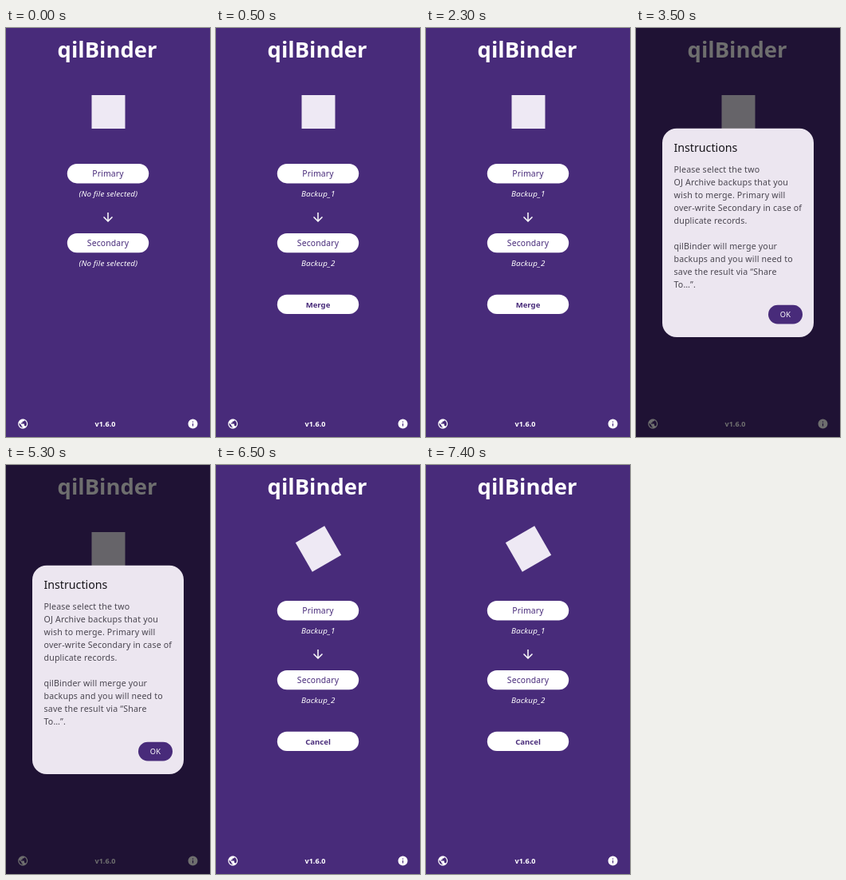
Recreate the animation shown at these times as an HTML page with a canvas. Size 256 px wide and 512 px high, loop 8 s.

```html
<!DOCTYPE html>
<html lang="en">
<head>
<meta charset="utf-8">
<style>
  html, body { margin: 0; width: 100%; height: 100%; overflow: hidden; background: #482b7a; }
  canvas { display: block; width: 256px; height: 512px; }
</style>
</head>
<body>
<canvas id="stage" width="256" height="512"></canvas>
<script>
const ctx = document.getElementById('stage').getContext('2d');
const LOOP = 8000, SELECTED = 500, DIALOG = 3500, MERGING = 6500;
const PURPLE = '#482b7a', WHITE = '#ffffff';

const globe = new Path2D('M12 2C6.48 2 2 6.48 2 12s4.48 10 10 10 10-4.48 10-10S17.52 2 12 2z' +
  'm-1 17.93c-3.95-.49-7-3.85-7-7.93 0-.62.08-1.21.21-1.79L9 15v1c0 1.1.9 2 2 2v1.93z' +
  'm6.9-2.54c-.26-.81-1-1.39-1.9-1.39h-1v-3c0-.55-.45-1-1-1H8v-2h2c.55 0 1-.45 1-1V7h2' +
  'c1.1 0 2-.9 2-2v-.41c2.93 1.19 5 4.06 5 7.41 0 2.08-.8 3.97-2.1 5.39z');
const info = new Path2D('M12 2a10 10 0 1 0 0 20a10 10 0 1 0 0-20zM11 7h2v2h-2zM11 11h2v6h-2z');
const downArrow = new Path2D('M20 12l-1.41-1.41L13 16.17V4h-2v12.17l-5.58-5.59L4 12l8 8 8-8z');

const paragraphs = [
  [180.5, ['Please select the two', 'OJ Archive backups that you', 'wish to merge. Primary will',
    'over-write Secondary in case of', 'duplicate records.']],
  [277, ['qilBinder will merge your', 'backups and you will need to', 'save the result via “Share', 'To…”.']]
];

function text(str, x, y, font, color, align = 'center', spacing = 0.15) {
  ctx.font = `${font} "Noto Sans", sans-serif`;
  ctx.letterSpacing = spacing + 'px';
  ctx.textAlign = align;
  ctx.fillStyle = color;
  ctx.fillText(str, x, y);
}

function box(x, y, w, h, r, color) {
  ctx.fillStyle = color;
  ctx.beginPath();
  ctx.roundRect(x, y, w, h, r);
  ctx.fill();
}

function icon(path, x, y, size) {
  ctx.save();
  ctx.translate(x - size / 2, y - size / 2);
  ctx.scale(size / 24, size / 24);
  ctx.fillStyle = WHITE;
  ctx.fill(path, 'evenodd');
  ctx.restore();
}

function button(label, y, font, spacing) {
  box(76.8, y, 102.4, 24.4, 12.2, WHITE);
  text(label, 128, y + 16, font, PURPLE, 'center', spacing);
}

function emblem(angle) {
  ctx.save();
  ctx.translate(128.5, 105);
  ctx.rotate(angle);
  box(-21, -21, 42, 42, 0, '#eee9f4');
  ctx.restore();
}

function mainScreen(selected, merging) {
  ctx.fillStyle = PURPLE;
  ctx.fillRect(0, 0, 256, 512);
  text('qilBinder', 127, 36.5, '600 27.4px', WHITE, 'center', 0);
  emblem(merging ? -Math.PI / 6 : 0);

  button('Primary', 170, '400 10.4px', 0.15);
  button('Secondary', 256.9, '400 10.4px', 0.15);
  icon(downArrow, 128, 237.1, 18);
  const caption = (str, y) => text(str, 128.3, y, 'italic 500 9.8px', WHITE);
  caption(selected ? 'Backup_1' : '(No file selected)', 211.3);
  caption(selected ? 'Backup_2' : '(No file selected)', 298.2);
  if (selected) button(merging ? 'Cancel' : 'Merge', 333.7, '600 9.6px', 0);

  icon(globe, 21.2, 495.5, 14.4);
  text('v1.6.0', 124.5, 499, '600 9px', WHITE, 'center', 0.05);
  icon(info, 234.5, 495.5, 14.4);
}

function dialog() {
  ctx.fillStyle = 'rgba(0, 0, 0, 0.57)';
  ctx.fillRect(0, 0, 256, 512);
  box(33, 125.7, 190, 261.3, 18, '#ece6f0');
  text('Instructions', 47.5, 154.5, '500 14.2px', '#161419', 'left', 0);
  for (const [top, lines] of paragraphs) {
    lines.forEach((line, i) => text(line, 47.5, top + i * 16.1, '400 10.6px', '#49454f', 'left', 0.18));
  }
  box(166, 346.8, 43, 23.6, 11.8, PURPLE);
  text('OK', 187.4, 362, '500 9.3px', WHITE);
}

function draw(now) {
  const t = now % LOOP;
  mainScreen(t >= SELECTED, t >= MERGING);
  if (t >= DIALOG && t < MERGING) dialog();
  requestAnimationFrame(draw);
}
requestAnimationFrame(draw);
</script>
</body>
</html>
```
